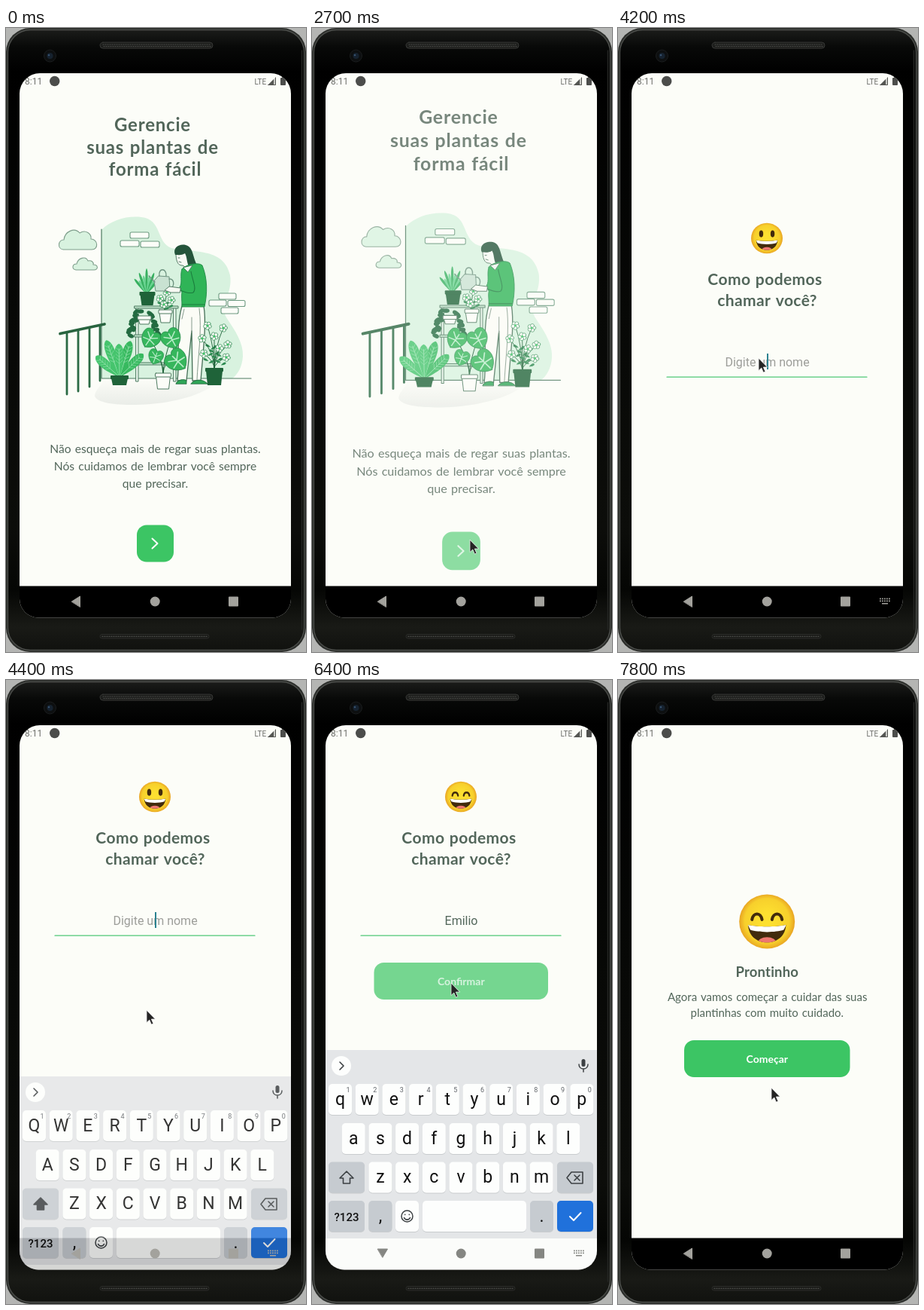
An HTML page with a canvas for the animation above (8000 ms loop, 399 by 828 pixels).

```html
<!DOCTYPE html>
<html lang="pt-BR">
<head>
<meta charset="utf-8">
<title>Plantas</title>
<style>
html, body { margin: 0; height: 100%; overflow: hidden; background: #000; }
canvas { display: block; width: 399px; height: 828px; }
</style>
</head>
<body>
<canvas id="stage"></canvas>
<script>
const W = 399, H = 828, LOOP = 8000, STEP = 100;
const GREEN = '#3cc564', DARK = '#4d7a60', DEEP = '#1f6339', PALE = '#d8f2df';
const PAPER = '#fcfdf8', INK = '#52665a';
const NAME = 'Emilio', KEY_TIMES = [4800, 4900, 5100, 5200, 5300, 5500];
const dpr = window.devicePixelRatio || 1;

const stage = document.getElementById('stage');
const buffer = document.createElement('canvas');
const [main, off] = [stage, buffer].map(c => {
  c.width = W * dpr;
  c.height = H * dpr;
  return c.getContext('2d');
});
let g = main;

// Linear keyframes: [time, value, value...]
function key(t, ...frames) {
  let a = frames[0];
  if (t <= a[0]) return a.slice(1);
  for (const b of frames) {
    if (t < b[0]) {
      const k = (t - a[0]) / (b[0] - a[0]);
      return a.slice(1).map((v, i) => v + (b[i + 1] - v) * k);
    }
    a = b;
  }
  return a.slice(1);
}

function shape(d, fill, line, width = 1) {
  const p = new Path2D(d);
  if (fill) { g.fillStyle = fill; g.fill(p); }
  if (line) { g.strokeStyle = line; g.lineWidth = width; g.stroke(p); }
}

function box(x, y, w, h, r, fill, line, width = 1) {
  g.beginPath();
  g.roundRect(x, y, w, h, r);
  if (fill) { g.fillStyle = fill; g.fill(); }
  if (line) { g.strokeStyle = line; g.lineWidth = width; g.stroke(); }
}

function oval(x, y, rx, ry, fill, line, width = 1, turn = 0) {
  g.beginPath();
  g.ellipse(x, y, rx, ry, turn, 0, 7);
  if (fill) { g.fillStyle = fill; g.fill(); }
  if (line) { g.strokeStyle = line; g.lineWidth = width; g.stroke(); }
}

function text(s, x, y, font, color, { align = 'center', letter = 0, word = 0 } = {}) {
  g.font = font;
  g.fillStyle = color;
  g.textAlign = align;
  g.letterSpacing = letter + 'px';
  g.wordSpacing = word + 'px';
  g.fillText(s, x, y);
}
const lato = (size, weight = 400) => `${weight} ${size}px Lato, sans-serif`;
const roboto = (size, weight = 400) => `${weight} ${size}px Roboto, sans-serif`;

function at(x, y, turn, draw) {
  g.save();
  g.translate(x, y);
  g.rotate(turn);
  draw();
  g.restore();
}

// Draws a group with one shared opacity, scaled about the screen centre.
function layer(alpha, scale, draw) {
  if (alpha <= 0) return;
  const back = g;
  g = off;
  g.setTransform(dpr, 0, 0, dpr, 0, 0);
  g.clearRect(0, 0, W, H);
  g.lineCap = g.lineJoin = 'round';
  g.translate(198.5, 400);
  g.scale(scale, scale);
  g.translate(-198.5, -400);
  draw();
  g = back;
  g.globalAlpha = alpha;
  g.drawImage(buffer, 0, 0, W, H);
  g.globalAlpha = 1;
}

function leaf(x, y, turn, len, w, fill, vein) {
  at(x, y, turn, () => {
    shape(`M0 0C${w * .6} ${-len * .3} ${w * 1.3} ${-len * .9} 0 ${-len}C${-w * 1.3} ${-len * .9} ${-w * .6} ${-len * .3} 0 0Z`, fill);
    if (!vein) return;
    shape(`M0 0V${-len * .85}`, null, vein, .9);
    for (let i = 4; i < 9; i++) {
      const m = -len * i / 10;
      shape(`M${-w * .5} ${m - 4}L0 ${m}L${w * .5} ${m - 4}`, null, vein, .6);
    }
  });
}

function pot(x, y, w, h, fill, line) {
  shape(`M${x - w / 2 + 1} ${y + 4}L${x - w / 2 + 3} ${y + h}H${x + w / 2 - 3}L${x + w / 2 - 1} ${y + 4}Z`, fill, line);
  box(x - w / 2, y, w, 5, 1, fill, line);
}

function flower(x, y, r) {
  for (let i = 0; i < 5; i++) {
    const a = i * 1.257 + x;
    oval(x + Math.cos(a) * r, y + Math.sin(a) * r, r * .8, r * .8, PAPER, '#3f9460', .8);
  }
  oval(x, y, r * .5, r * .5, GREEN);
}

function bouquet(x, y, tips, r) {
  for (const [tx, ty] of tips) {
    shape(`M${x} ${y}Q${x} ${(y + ty) / 2} ${tx} ${ty}`, null, DEEP, .9);
    const mx = x * .45 + tx * .55, my = (y + ty) / 2;
    leaf(mx, my, -1.1, r * 2.5, r * .7, '#2c8a50');
    leaf(mx, my + 3, 1.1, r * 2.5, r * .7, '#2c8a50');
  }
  for (const [tx, ty] of tips) flower(tx, ty, r);
}

function heart(x, y, turn, s) {
  at(x, y, turn, () => {
    g.scale(s, s);
    shape('M0 14C-10 10 -16 0 -12 -9C-8 -14 -2 -13 0 -9C2 -13 8 -14 12 -9C16 0 10 10 0 14Z', '#36b65c', '#248a48', .7);
    shape('M0 -7V11M0 0L-8 -6M0 0L8 -6M0 2L-9 4M0 2L9 4', null, '#b8ecc8', 1.5);
  });
}

function room() {
  shape('M127 268C140 255 160 249 180 251C208 254 199 284 220 292C246 299 290 290 298 328C302 352 284 366 293 384C305 402 316 418 315 436C314 450 308 460 301 465H127Z', PALE);
  const shade = g.createLinearGradient(0, 465, 0, 501);
  shade.addColorStop(0, PAPER);
  shade.addColorStop(1, '#e9ece7');
  shape('M130 466H285C270 484 230 496 192 499C150 502 120 498 118 488C119 479 128 474 130 466Z', shade);
  shape('M127 267V465H326', null, DARK, 1.2);
  shape('M76 294C68 293 69 281 77 281C78 270 91 264 98 272C106 267 114 273 113 280C122 280 124 294 114 294Z', PALE, '#7f9f8c', 1.1);
  shape('M93 321C87 320 88 313 94 313C96 305 106 302 109 309C114 308 117 311 116 314C123 314 123 321 117 321Z', PALE, '#7f9f8c', 1.1);
  for (const [x, y] of [[165, 271], [152, 282], [179, 283], [283, 352], [270, 361], [295, 361.5], [286, 371]])
    box(x, y, x < 200 ? 25 : 23, 8, 2, PAPER, '#6c9a80', 1.1);
  for (const [x, y, b] of [[81, 404, 486], [96, 401, 482], [111, 398, 476], [125, 395, 468]])
    shape(`M${x} ${y}V${b}`, null, '#2a6a44', 2.8);
  shape('M72 405.5L131 393', null, '#28643f', 3.8);
}

function shelf() {
  for (const x of [173, 223]) box(x, 371, 3, 98, 0, '#e9f6ec', DARK);
  for (const y of [369, 407, 444]) box(171, y, 58, 3, 0, '#bfe3ca', DARK);
  for (let i = -4; i <= 4; i++)
    leaf(187, 353, i * .17, 34 - Math.abs(i) * 2 - (i & 1) * 7, 2.2, i & 1 ? '#6ad492' : '#37b060');
  pot(188, 350, 21, 18, DEEP);
  bouquet(211, 375, [[205, 359], [214, 351], [220, 361], [210, 367]], 2.8);
  pot(212, 374, 18, 17, PAPER, DARK);
  // Trailing vines, alternating left and right of the pot
  for (let i = 0; i < 24; i++) {
    const side = i & 1 ? 1 : -1, k = i / 24, wave = Math.sin(i * 2.4);
    oval(183 + side * (4 + 15 * Math.sqrt(k)) + wave * 2, 376 + k * 34 + wave * 2, 4.4, 2.7, '#236b41', null, 1, wave * .8);
  }
  pot(184, 382, 18, 11, PAPER, DARK);
}

function woman() {
  const trim = '#456f57';
  shape('M234 369H263C267 392 262 430 259 468H248L247 402L240 468H228C232 435 225 400 234 369Z', '#fbfcf6', trim, 1.3);
  shape('M257 372C261 400 255 440 254 467M247 384V404M237 373L234 386', null, '#869b8d', 1);
  shape('M226 472C227 467 237 465 240 468V472ZM246 472C249 467 261 464 268 472Z', '#2fa557', DEEP, .8);
  shape('M226 299C226 308 228 315 234 315C237 315 239 318 239 322L247 317L241 297Z', '#f7f9f3', trim, .9);
  shape('M225 301C221 291 231 286 239 288C251 291 247 307 258 321C252 324 246 321 243 316C240 310 241 304 238 299C234 302 229 301 225 301Z', '#24543a');
  shape('M229 305H231M230 310L233 311', null, trim, .9);
  shape('M234 320C238 314 256 310 261 315C268 332 268 352 264 370H234C234 360 233 356 234 351L231 344C235 338 231 328 234 320Z', '#2fb457', '#1f8a45', .9);
  shape('M246 323C248 335 254 346 249 351C243 353 237 350 232 348M234 367H264', null, '#1b7d3d', 1.1);
  shape('M236 318L242 324L248 315Z', '#eef7ef', trim, .8);
  shape('M203 329L217 330L218 349H199L197 336Z', '#c9e2d2', '#6e9380', 1);
  shape('M198 337L190 329M204 329C202 318 214 318 213 329M217 333C225 332 224 345 218 346', null, '#6e9380', 1.4);
  shape('M232 345L217 343L211 348L219 351H231Z', '#f7f9f3', trim, .9);
}

function plants() {
  [[-.85, 42], [.8, 44], [-.35, 52], [.3, 50], [-.02, 44]].forEach(([a, n], i) =>
    leaf(151, 463, a, n, 8.5, i & 1 ? '#37b95f' : '#45c46d', '#8fe0a9'));
  pot(151, 461, 24, 13, DEEP);
  for (const [x, y] of [[192, 413], [220, 412], [229, 441], [199, 434]])
    shape(`M209 460Q209 440 ${x} ${y}`, null, DEEP, 1);
  heart(199, 436, .35, .75);
  heart(192, 412, .6, .95);
  heart(220, 412, -.5, 1);
  heart(227, 441, -.8, 1.1);
  pot(209, 458, 21, 21, PAPER, DARK);
  bouquet(277, 452, [[268, 395], [289, 398], [261, 412], [277, 409], [295, 420], [284, 425], [263, 432], [293, 437]], 3);
  pot(277, 451, 24, 23, DEEP);
}

function emoji(x, y, r, happy) {
  at(x, y, 0, () => {
    g.scale(r, r);
    const skin = g.createRadialGradient(0, -.1, .2, 0, 0, 1);
    skin.addColorStop(0, '#fde030');
    skin.addColorStop(.75, '#f7d02c');
    skin.addColorStop(1, '#e8a323');
    oval(0, 0, 1, .97, skin);
    const brown = '#422b0d';
    for (const s of [-1, 1]) {
      if (happy) shape(`M${s * .36 - .18} -.07C${s * .36 - .14} -.34 ${s * .36 + .14} -.34 ${s * .36 + .18} -.07`, null, brown, .11);
      else oval(s * .36, -.28, .13, .22, brown);
    }
    const mouth = 'M-.68 .12C-.35 .2 .35 .2 .68 .12C.66 .52 .36 .75 0 .75C-.36 .75 -.66 .52 -.68 .12Z';
    shape(mouth, brown);
    g.clip(new Path2D(mouth));
    shape('M-.7 .1C-.35 .2 .35 .2 .7 .1L.6 .3C.3 .4 -.3 .4 -.6 .3Z', '#fff');
    oval(0, .78, .34, .22, '#ed7770');
  });
}

function button(x, y, w, label, alpha = 1) {
  g.globalAlpha = alpha;
  box(x, y, w, 49, 13, GREEN);
  if (label) text(label, 198.3, y + 29.5, lato(14, 700), '#fff');
  else shape('M194.5 677.5L201.5 684L194.5 690.5', null, '#fff', 2);
  g.globalAlpha = 1;
}

function welcome(t) {
  const title = { letter: .8, word: 1 }, body = { word: 1.1 };
  text('Gerencie', 195, 136.5, lato(24, 700), INK, title);
  text('suas plantas de', 195, 166.5, lato(24, 700), INK, title);
  text('forma fácil', 198.5, 196, lato(24, 700), INK, title);
  room();
  shelf();
  woman();
  plants();
  text('Não esqueça mais de regar suas plantas.', 198.5, 564, lato(15.6), INK, body);
  text('Nós cuidamos de lembrar você sempre', 198.5, 587, lato(15.6), INK, body);
  text('que precisar.', 198.5, 609.5, lato(15.6), INK, body);
  button(174, 659.5, 49, '', t >= 2500 ? .74 : 1);
}

function form(t, typed) {
  const focus = t >= 4100, caret = focus && t < 4600 || t >= 4800 && t < 6200;
  g.save();
  if (t >= 4400 && t < 6500) g.translate(0, -124);
  emoji(198, 279, 21, typed);
  text('Como podemos', 195.5, 341, lato(21, 700), INK, { letter: .4, word: 1 });
  text('chamar você?', 198.5, 369, lato(21, 700), INK, { letter: .4, word: 1 });
  let edge = 199;
  if (typed) {
    text(typed, 198.5, 448.5, roboto(16), INK);
    const half = g.measureText(typed).width / 2;
    edge = 199.5 + half;
    if (t < 6200) shape(`M${198.5 - half} 451H${198.5 + half}`, null, '#9aa59e', .8);
    button(82.5, 499, 231.5, 'Confirmar', t >= 6200 ? .7 : 1);
  } else {
    text('Digite um nome', 198.5, 448.5, roboto(16), '#9d9e9a');
  }
  shape('M65 463.2H331', null, focus ? '#4fc877' : '#c9ccc8', 1.2);
  if (caret) box(edge - 1, 432, 2, 21, 0, typed ? '#2aa866' : '#2b8290');
  g.restore();
}

function done() {
  emoji(198.2, 320.5, 37, true);
  text('Prontinho', 198.3, 393.5, lato(18.5, 700), INK, { letter: .2 });
  text('Agora vamos começar a cuidar das suas', 198.7, 425.5, lato(15), INK, { word: 1 });
  text('plantinhas com muito cuidado.', 198.3, 447, lato(15), INK, { word: 1 });
  button(88, 478, 220.5, 'Começar');
}

function cap(x, y, w, label, fill = '#fdfefd', size = 23) {
  box(x, y + 1, w, 41, 5, '#c9ccce');
  box(x, y, w, 41, 5, fill);
  if (label) text(label, x + w / 2, y + (size > 20 ? 27.5 : 26.5), roboto(size, size > 20 ? 400 : 500), '#111');
}

function keyboard(t, typed) {
  const upper = t < 4800, grey = '#c6cbd0', ink = '#3c4043';
  box(18, 491, 361, 250, 0, '#e4e6e8');
  box(18, 741, 361, 60, 0, '#fbfcfa');
  oval(39, 512, 13, 13, '#fdfefd');
  shape('M37 507L42 512L37 517', null, ink, 1.6);
  box(358.5, 503, 5, 10, 2.5, ink);
  shape('M355 510C355 518 367 518 367 510M361 516V520', null, ink, 1.5);
  if (typed && t < 6400) {
    shape('M144.5 502V522M250.5 502V522', null, '#c3c6c9');
    text(typed.slice(0, -1), 97, 518, roboto(16), ink);
    text(typed, 197, 518, roboto(16), ink);
    if (typed === NAME) {
      text('emiliokv', 297, 507, roboto(14), ink);
      text('@mail.test', 297, 522, roboto(11), ink);
    }
  }
  [['qwertyuiop', 22, 536], ['asdfghjkl', 39.7, 588], ['zxcvbnm', 75.4, 639.5]].forEach(([row, x, y], r) =>
    [...row].forEach((c, i) => {
      cap(x + i * 35.7, y, 31, upper ? c.toUpperCase() : c);
      if (!r) text((i + 1) % 10, x + i * 35.7 + 26, y + 11, roboto(9), '#5f6368');
    }));
  cap(22, 639.5, 48, '', grey);
  shape('M46 652L55 661H50.5V668H41.5V661H37Z', upper ? ink : null, ink, 1.6);
  cap(326, 639.5, 48, '', grey);
  shape('M339 660.5L345 653H360V668H345ZM349 657L356 664M356 657L349 664', null, ink, 1.6);
  cap(22, 691, 48, '?123', grey, 15);
  cap(75.4, 691, 31, ',', grey);
  cap(111, 691, 31, '');
  oval(126.5, 711.5, 7.5, 7.5, null, ink, 1.5);
  shape('M122.5 713.5C124 717 129 717 130.5 713.5M123.7 709.2V709.4M129.3 709.2V709.4', null, ink, 1.6);
  cap(147, 691, 138, '');
  cap(290, 691, 31, '.', grey);
  cap(326, 691, 48, '', '#2071db');
  shape('M343 712L348 717L357.5 707', null, '#fff', 2);
}

function navIcons(t) {
  const light = t >= 4500 && t < 6500, c = light ? '#858682' : '#a3a29d';
  shape(light ? 'M87.5 755H100.5L94 766Z' : 'M87.5 761L98.5 754V768Z', c, c, 1);
  oval(198.2, 761, 6.5, 6.5, c);
  box(296, 754.5, 13, 13, 1, c);
  if (t < 4200 || t >= 6500) return;
  for (let i = 0; i < 10; i++) box(348 + i % 5 * 3, 756.5 + (i > 4) * 3, 1.8, 1.8, 0, c);
  box(351, 763, 8, 1.6, 0, c);
}

function statusBar() {
  const c = '#6d6e6b';
  text('8:11', 25, 75, roboto(12), c, { align: 'left' });
  oval(64.7, 70.5, 6.7, 6.7, '#4c4d4b');
  text('LTE', 330.5, 74.5, roboto(10), c, { align: 'left' });
  shape('M348 76H359V65Z', '#c9cac6');
  shape('M348 76H356V68Z', '#555653');
  shape('M358.5 66V75.5H349', null, '#555653', 1);
  box(365, 66, 7, 10, 1, '#4c4d4b');
  box(367, 64.8, 3, 2, 0, '#4c4d4b');
}

function phone() {
  box(0, 0, W, H, 0, '#b4b5b3');
  box(0, 0, W, H, 32, '#2b2d2a');
  const body = g.createLinearGradient(0, 0, 0, H);
  [[0, '#1d1e1c'], [.03, '#080908'], [.07, '#000'], [.45, '#070806'], [.8, '#0c0d0a'], [.9, '#050604'], [.96, '#191a16'], [1, '#10110e']]
    .forEach(([p, c]) => body.addColorStop(p, c));
  box(2.5, 2.5, 394, 823, 30, body, '#4b4d4a', 1.3);
  shape('M393.5 30V798', null, '#252724', 1.5);
  box(125, 19, 150, 8, 4, '#1d1e1c', '#363735');
  box(125, 804.5, 145, 5.5, 2.5, '#1b1c19', '#2a2b28');
  g.setLineDash([1, 2]);
  shape('M129 22H271M130 24.5H272M128 807.3H267', null, '#4b4c49', 1.2);
  g.setLineDash([]);
  oval(58.5, 37, 8, 8, '#0d0f10', '#1b1d1e');
  oval(58.5, 37, 4, 4, '#16222f');
  oval(57, 36, 1.3, 1.3, '#35506d');
}

function pointer(t) {
  if (t < 700) return;
  const [x, y] = key(t,
    [800, 76, 601], [1500, 261.5, 655], [1800, 261.5, 655], [2500, 209.5, 679],
    [3200, 209.5, 679], [3300, 208.5, 669], [3400, 208.5, 669], [3500, 209.5, 585],
    [3600, 209.5, 585], [4000, 186.5, 438], [5900, 186.5, 438], [6100, 184.5, 402],
    [7100, 184.5, 402], [7300, 228, 609], [7400, 228, 609], [7800, 203.5, 541]);
  at(x, y, 0, () =>
    shape('M0.5 0.5V16.5L4.3 13L6.9 19L9.4 17.9L6.8 12H11.8Z', '#242424', 'rgba(240,240,240,.85)', .9));
}

function frame(now) {
  const t = Math.floor(now % LOOP / STEP) * STEP;
  const typed = NAME.slice(0, KEY_TIMES.filter(k => t >= k).length);
  g.setTransform(dpr, 0, 0, dpr, 0, 0);
  g.lineCap = g.lineJoin = 'round';
  phone();

  g.save();
  g.beginPath();
  g.roundRect(18, 60, 361, 722.5, [27, 27, 25, 25]);
  g.clip();
  box(18, 60, 361, 723, 0, PAPER);

  const [a1, s1] = key(t, [2600, 1, 1], [2700, .78, 1.035], [2800, .3, 1.062], [2900, .05, 1.075], [3000, 0, 1.08]);
  layer(a1, s1, () => welcome(t));

  const [a2, s2] = t < 4000
    ? key(t, [2700, 0, .9], [2800, .4, .95], [2900, .85, .988], [3000, 1, 1])
    : key(t, [6400, 1, 1], [6500, .45, 1.055], [6600, .07, 1.076], [6700, 0, 1.08]);
  layer(a2, s2, () => form(t, typed));

  const [a3, s3] = key(t, [6400, 0, .88], [6500, .35, .93], [6600, .82, .977], [6700, .93, .989], [6800, .97, .995], [7000, 1, 1]);
  layer(a3, s3, done);

  box(18, 740.5, 361, 43, 0, '#000');
  const [ka, ky] = t < 5000
    ? key(t, [4200, 0, 200], [4300, .35, 140], [4400, .85, 35], [4500, 1, 0])
    : key(t, [6400, 1, 0], [6500, .55, 70], [6600, .15, 152.5], [6700, 0, 240]);
  layer(ka, 1, () => {
    g.translate(0, ky);
    keyboard(t, typed);
  });
  navIcons(t);
  statusBar();
  g.restore();

  pointer(t);
}

const start = performance.now();
function tick() {
  frame(performance.now() - start);
  requestAnimationFrame(tick);
}
tick();
</script>
</body>
</html>
```
